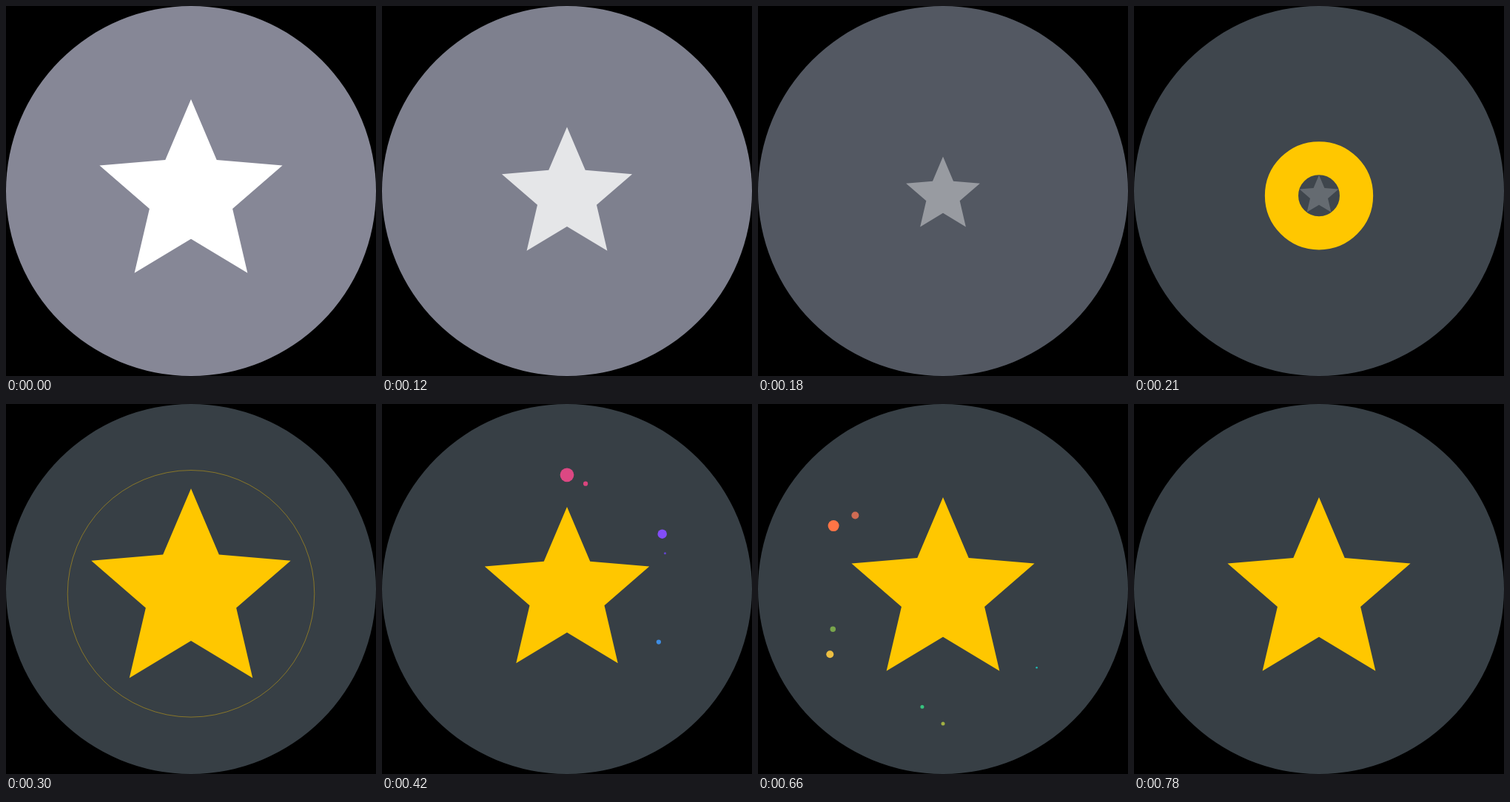
An HTML page with a canvas for the animation above (0.93 s loop, 500 by 500 pixels).

```html
<!DOCTYPE html>
<html lang="en">
<head>
<meta charset="utf-8">
<title>Favourite star</title>
<style>
  html, body { margin: 0; width: 100%; height: 100%; overflow: hidden; background: #000; }
  canvas { display: block; width: 500px; height: 500px; }
</style>
</head>
<body>
<canvas id="stage" width="500" height="500"></canvas>
<script>
const ctx = document.getElementById('stage').getContext('2d');
const LOOP = 930, STEP = 30, LIFE = 270;
const GOLD = '#ffc700', GREY = '#868796', SLATE = '#373f45';
const STAR = new Path2D('M12 17.27 18.18 21 16.54 13.97 22 9.24 14.81 8.63 12 2 9.19 8.63 2 9.24 7.46 13.97 5.82 21Z');
const STAR_UNIT = 12.36, STAR_Y = 256.2;

// Colours clockwise from the top; each dot fades into the next one's colour
const BIG = {
  start: 330, travel: 50, size: 12.5, turn: 0,
  colors: ['#ff4d46', '#963efc', '#4082e6', '#32e1c8', '#afaa32', '#ffc546']
};
const SMALL = {
  start: 360, travel: 31.25, size: 6.25, turn: 10,
  colors: ['#fb4867', '#643cc8', '#5082e6', '#18c8b4', '#40c370', '#96963a']
};

const span = (t, a, b) => Math.min(1, Math.max(0, (t - a) / (b - a)));
const smooth = p => p * p * (3 - 2 * p);
const lerp = (a, b, p) => a + (b - a) * p;
const ease = (t, t0, t1, a, b) => lerp(a, b, smooth(span(t, t0, t1)));
const channel = (hex, i) => parseInt(hex.substr(1 + 2 * i, 2), 16);
const mix = (a, b, p) =>
  `rgb(${[0, 1, 2].map(i => Math.round(lerp(channel(a, i), channel(b, i), p)))})`;

function disc(x, y, r, fill) {
  ctx.fillStyle = fill;
  ctx.beginPath();
  ctx.arc(x, y, r, 0, 2 * Math.PI);
  ctx.fill();
}

function star(scale, fill, alpha = 1) {
  if (scale <= 0 || alpha <= 0) return;
  ctx.save();
  ctx.globalAlpha = alpha;
  ctx.translate(250, STAR_Y);
  ctx.scale(scale * STAR_UNIT, scale * STAR_UNIT);
  ctx.translate(-12, -12.535);
  ctx.fillStyle = fill;
  ctx.fill(STAR);
  ctx.restore();
}

// Grows outwards while its band thins to a hairline
function ring(t) {
  if (t <= 180 || t > 300) return;
  const p = span(t, 180, 300);
  const outer = 167.2 * p * (2 - p);
  const width = lerp(60, 0.8, p);
  ctx.save();
  ctx.globalAlpha = Math.min(1, width / 1.6);
  ctx.strokeStyle = GOLD;
  ctx.lineWidth = width;
  ctx.beginPath();
  ctx.arc(250, 256.3, outer - width / 2, 0, 2 * Math.PI);
  ctx.stroke();
  ctx.restore();
}

function goldScale(t) {
  if (t < 300) return ease(t, 210, 300, 0, 1.09);
  if (t < 420) return ease(t, 300, 420, 1.09, 0.9);
  return ease(t, 420, 540, 0.9, 1);
}

// Each dot follows its neighbour by one step: grows, shrinks, drifts outwards
function dots(t, { start, travel, size, turn, colors }) {
  colors.forEach((color, i) => {
    const age = t - i * STEP - start;
    if (age <= 0 || age >= LIFE) return;
    const p = age / LIFE;
    const angle = (i * 60 + turn) * Math.PI / 180;
    const dist = 137.5 + travel * p;
    const r = size * Math.min(age / 120, (LIFE - age) / 150);
    const next = colors[(i + 1) % colors.length];
    disc(250 + dist * Math.sin(angle), 250 - dist * Math.cos(angle), r, mix(color, next, p));
  });
}

function draw(t) {
  const fade = span(t, 90, 240);
  ctx.clearRect(0, 0, 500, 500);
  disc(250, 250, 250, mix(GREY, SLATE, smooth(fade)));
  star(1 - span(t, 0, 240) ** 1.8, '#fff', 1 - fade);
  ring(t);
  star(goldScale(t), GOLD);
  dots(t, BIG);
  dots(t, SMALL);
}

function tick() {
  const t = performance.now() % LOOP;
  draw(Math.floor(t / STEP + 0.001) * STEP);
  requestAnimationFrame(tick);
}
tick();
</script>
</body>
</html>
```
